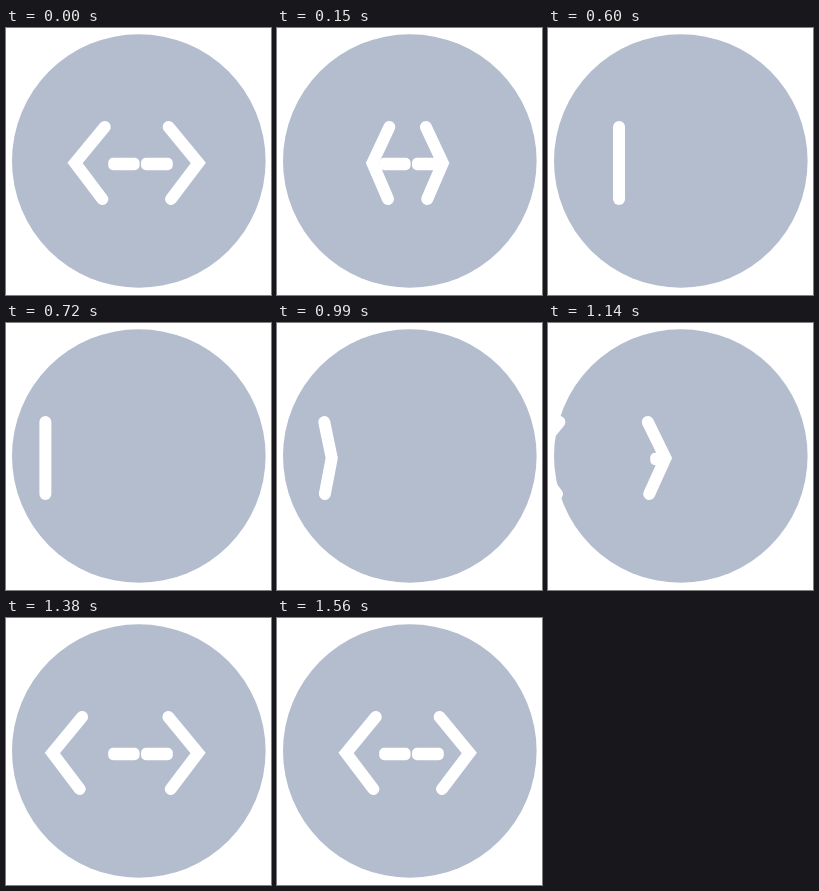
These frames come from a looping animation (265 by 267 pixels, 2.67 s). An HTML page with a canvas:

```html
<!DOCTYPE html>
<html lang="en">
<head>
<meta charset="utf-8">
<style>
  html, body { margin: 0; width: 100%; height: 100%; overflow: hidden; background: #fff; }
  canvas { display: block; }
</style>
</head>
<body>
<canvas id="stage" width="265" height="267"></canvas>
<script>
const ctx = document.getElementById('stage').getContext('2d');
const LOOP = 2670, STEP = 30, MID = 130.5, LEFT = 98.7, RIGHT = 162.7, BEND = 29.6;

const part = (t, a, b) => Math.min(1, Math.max(0, (t - a) / (b - a)));
const ease = (t, a, b) => (1 - Math.cos(Math.PI * part(t, a, b))) / 2;
const mix = (a, b, p) => a + (b - a) * p;

// x is the upper end; a positive bend points right
function chevron(x, bend) {
  ctx.beginPath();
  ctx.moveTo(x, 99);
  ctx.lineTo(x + bend, 135);
  ctx.lineTo(x + bend * 0.08, 171);
  ctx.stroke();
}

// Two dashes, visible only between the chevron tips
function dashes(from, to) {
  if (to <= from) return;
  ctx.save();
  ctx.beginPath();
  ctx.rect(from, 0, to - from, 267);
  ctx.clip();
  ctx.beginPath();
  ctx.roundRect(102.2, 129.7, 31.4, 12.6, 5);
  ctx.roundRect(135, 129.7, 31.8, 12.6, 5);
  ctx.fill();
  ctx.restore();
}

function draw(t) {
  ctx.fillStyle = '#fff';
  ctx.fillRect(0, 0, 265, 267);
  ctx.fillStyle = '#b3bdce';
  ctx.beginPath();
  ctx.arc(132.8, 133, 126.8, 0, 2 * Math.PI);
  ctx.fill();

  ctx.fillStyle = ctx.strokeStyle = '#fff';
  ctx.lineWidth = 12;
  ctx.lineCap = 'round';
  ctx.lineJoin = 'miter';

  if (t < 330) {                       // both chevrons merge into a bar
    const p = ease(t, 0, 330), bend = BEND * (1 - p);
    const l = mix(LEFT, MID, p), r = mix(RIGHT, MID, p);
    dashes(l - bend, r + bend);
    chevron(l, -bend);
    chevron(r, bend);
  } else if (t < 870) {                // the bar swings left
    chevron(mix(MID, 31, ease(t, 330, 810)), 0);
  } else {                             // it shoots back, the other one follows
    const x = mix(31, RIGHT, ease(t, 870, 1395));
    const bend = BEND * part(t, 880, 1315);
    dashes(0, x + bend);
    chevron(x, bend);
    chevron(LEFT - 110 * (1 - ease(t, 960, 1560)), -BEND);
  }
}

let start;
function tick(now) {
  start ??= now;
  const t = (now - start) % LOOP;
  draw(Math.floor(t / STEP) * STEP);
  requestAnimationFrame(tick);
}
draw(0);
requestAnimationFrame(tick);
</script>
</body>
</html>
```
